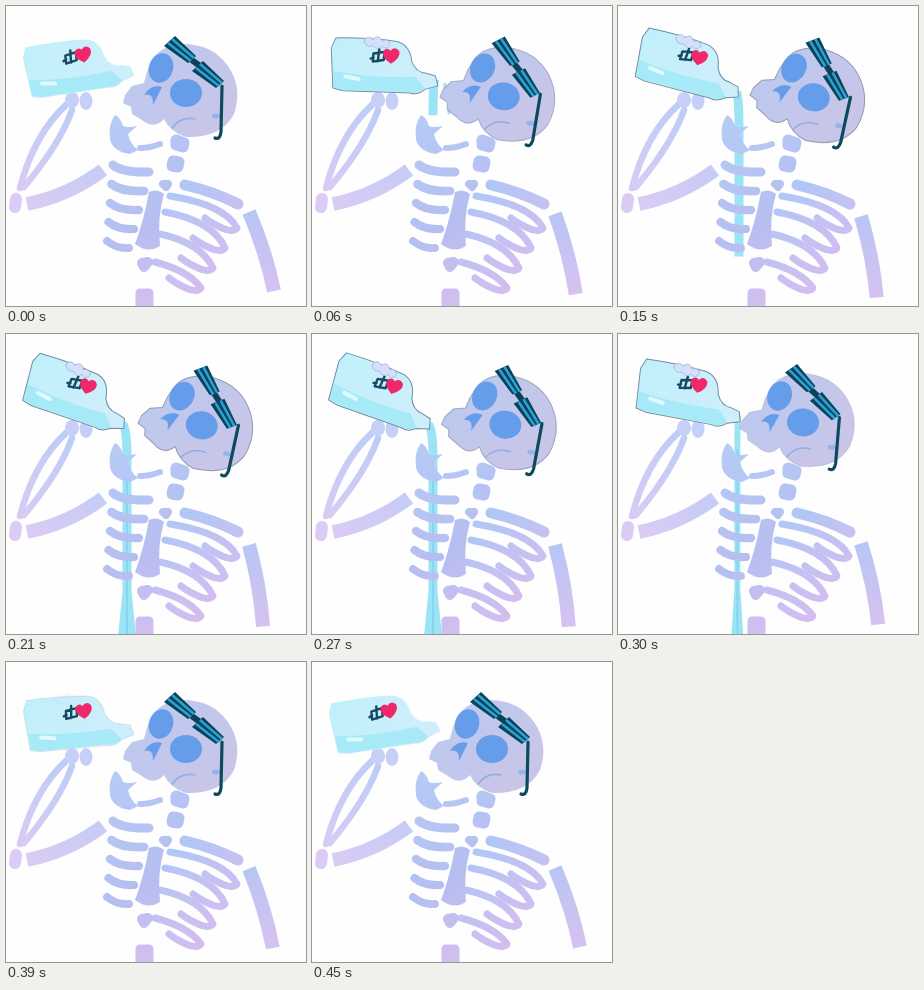
These frames come from a looping animation (300x300 px, 540 ms). An HTML page:

```html
<!DOCTYPE html>
<html lang="en">
<head>
<meta charset="utf-8">
<title>Thirsty skeleton</title>
<style>
  html, body { margin: 0; width: 100%; height: 100%; overflow: hidden; background: #fefefe; }
  svg { display: block; width: 100vw; height: 100vh; }
</style>
</head>
<body>
<svg viewBox="0 0 300 300" fill="none" stroke-linecap="round" stroke-linejoin="round">
  <defs>
    <linearGradient id="bone" gradientUnits="userSpaceOnUse" x1="110" y1="110" x2="200" y2="290">
      <stop offset="0" stop-color="#b5cbf6"/>
      <stop offset=".55" stop-color="#b6bef0"/>
      <stop offset="1" stop-color="#d9bff0"/>
    </linearGradient>
    <linearGradient id="rib" gradientUnits="userSpaceOnUse" x1="155" y1="190" x2="215" y2="260">
      <stop offset="0" stop-color="#adc8f6"/>
      <stop offset="1" stop-color="#d3bdf0"/>
    </linearGradient>
    <linearGradient id="arm" gradientUnits="userSpaceOnUse" x1="80" y1="100" x2="10" y2="200">
      <stop offset="0" stop-color="#b9cdf7"/>
      <stop offset="1" stop-color="#dccbf4"/>
    </linearGradient>
    <linearGradient id="side" gradientUnits="userSpaceOnUse" x1="240" y1="205" x2="265" y2="290">
      <stop offset="0" stop-color="#b7c6f4"/>
      <stop offset="1" stop-color="#d8c1f0"/>
    </linearGradient>
    <linearGradient id="head" x1="0" y1="0" x2="1" y2=".6">
      <stop offset="0" stop-color="#b9caf0"/>
      <stop offset="1" stop-color="#c9c5e8"/>
    </linearGradient>
    <linearGradient id="glass" x1="0" y1="0" x2="1" y2=".3">
      <stop offset="0" stop-color="#bff0fb"/>
      <stop offset="1" stop-color="#cfeefb"/>
    </linearGradient>
  </defs>

  <path id="stream" fill="#9be4f6"/>
  <path id="streak" stroke="#78c8ec" stroke-width="2" opacity=".55"/>
  <path id="drops" fill="#9fe4f6" d="M137 101q5 4 0 8q-4-4 0-8zM133 76q4 4 0 8q-4-4 0-8z"/>

  <g stroke="url(#arm)">
    <path stroke-width="6.5" d="M61 98Q28 128 14 182"/>
    <path stroke-width="6.5" d="M66 104Q54 138 18 181"/>
    <path stroke-width="14" stroke-linecap="butt" d="M21 198Q62 190 97 164"/>
    <path stroke-width="12" d="M10 193l-1 8"/>
  </g>
  <g id="ribs"></g>
  <g stroke="url(#bone)">
    <path stroke-width="11" d="M170 134l8 3l-1 4l-7-2zM167 155l6 1l-1 5l-6-1z"/>
    <path stroke-width="8" d="M157 178l5 0l-2 3z"/>
    <path stroke-width="10" d="M136 257l6-1l-4 5z"/>
    <path stroke-width="9" d="M134 287h9v14h-9z" fill="url(#bone)"/>
    <path stroke-width="6" d="M134 142Q144 142 154 138"/>
    <path stroke-width="11" stroke="url(#rib)" d="M179 179Q206 185 232 198"/>
  </g>
  <g fill="url(#bone)">
    <path d="M109 109Q102 118 104 134Q108 146 124 148L132 144Q124 138 122 128L131 120Q121 122 117 120Q114 111 109 109Z"/>
    <path d="M143 186Q151 182 158 188Q151 212 154 240Q142 248 129 238Q138 214 143 186Z"/>
  </g>
  <path id="side-arm" stroke="url(#side)" stroke-width="14" stroke-linecap="butt" d="M243 206Q260 246 268 285"/>

  <g id="skull">
    <path id="cranium" fill="url(#head)" stroke="#7f89a8" d="M126 80L138 77Q140 66 145 56Q152 41 174 38Q206 37 222 60Q237 82 228 108Q216 132 180 131Q164 126 158 113Q148 124 136 114L126 108L125 101L117 97L119 89Z"/>
    <g fill="#669deb">
      <ellipse cx="155" cy="62" rx="12" ry="15" transform="rotate(18 155 62)"/>
      <ellipse cx="180" cy="87" rx="16" ry="14"/>
      <path d="M138 89Q145 78 156 81L147 99Q148 86 138 89Z"/>
      <ellipse cx="210" cy="110" rx="4" ry="2.5" fill="#94b4ee"/>
    </g>
    <path stroke="#93aee0" stroke-width="1.6" d="M166 122Q175 110 189 113"/>
    <path stroke="#0c4a5f" stroke-width="3.2" d="M216 80L215 126Q214 134 209 132"/>
    <g id="glasses">
      <path stroke="#0b425a" stroke-width="6" d="M183 52L194 60"/>
      <g id="lens">
        <path fill="#0b425a" d="M158 40L169 30L190 50L182 57Z"/>
        <path stroke="#2aa2d4" stroke-width="2.6" stroke-linecap="butt" d="M162 37L185 55M166 33L188 52"/>
      </g>
      <use href="#lens" x="28" y="25"/>
    </g>
  </g>

  <g fill="#c5cff7">
    <ellipse cx="66" cy="94" rx="7" ry="8"/>
    <ellipse cx="80" cy="95" rx="6.5" ry="9"/>
  </g>
  <g id="bottle">
    <path id="outline" fill="url(#glass)" stroke="#6d8ea3" d="M20 40L25 30Q60 31 86 36Q99 40 100 57Q104 68 114 69L123 72L125 82L112 85Q104 91 97 88L30 83L20 80Z"/>
    <path fill="#9fe9f8" opacity=".8" d="M21 63Q60 72 103 72L112 84Q104 90 97 87L30 82L21 79Z"/>
    <path stroke="#eefcff" stroke-width="4" opacity=".8" d="M33 69L46 72"/>
    <path stroke="#174a60" stroke-width="2.4" d="M62 47l11-1l-1 8l-11 1zM68 43l-2 12M59 52l3-1"/>
    <path fill="#f0286b" d="M79 58Q69 51 72 45Q76 41 79 45Q84 40 88 46Q89 53 79 58Z"/>
    <path id="fingers" fill="#d5e0fa" stroke="#a9b6d6" stroke-width=".8" d="M53 35q3-8 9-2q6-6 9 2q7-3 8 4q-4 6-8 1q-5 5-9-1q-6 3-9-4z"/>
  </g>
</svg>
<script>
const LOOP = 540, STEP = 30, FLOOR = 302;
const PIVOT = [72, 60], NECK = [50, 16];
const el = id => document.getElementById(id);
const set = (id, attrs) => { for (const k in attrs) el(id).setAttribute(k, attrs[k]); };
const ramp = (t, a, b) => Math.max(0, Math.min(1, (t - a) / (b - a)));
const smooth = x => x * x * (3 - 2 * x);

function drawRibs() {
  const rod = (color, width, d) => `<path stroke="url(#${color})" stroke-width="${width}" d="${d}"/>`;
  let out = '';
  for (let i = 0; i < 5; i++) {
    out += rod('bone', 9 - i * .3, `M${107 - i * 1.5} ${159 + i * 19}q10 8 ${36 - i * 3.5} 7`);
  }
  for (let i = 0; i < 4; i++) {
    const x = 164 - 5 * i, y = 190 + 13 * i + 3 * i * i;
    const tipX = 231 - 12 * i, tipY = 222 + 20 * i;
    out += rod('rib', 7, `M${x} ${y}Q${tipX - 12} ${y + 9} ${tipX} ${tipY}q-4 5-15 0t-17-10`);
  }
  el('ribs').innerHTML = out;
}

// Bottle tilt, 0 = resting, 1 = fully tipped
const lift = t => t < 270
  ? Math.sin(Math.PI / 2 * ramp(t, 0, 240))
  : (1 - ramp(t, 270, 450)) ** 2;

// Head turn, 0 = at the bottle, 1 = leaning away
const lean = t => smooth(ramp(t, 0, 90)) * (1 - smooth(ramp(t, 250, 330)));

function drawHead(k) {
  set('skull', { transform: `translate(${18.5 * k} ${2 * k}) rotate(${11 * k} 166.5 74)` });
  set('glasses', { transform: `rotate(${10 * k} 188 57)` });
  set('cranium', { 'stroke-opacity': .8 * k });
}

function drawBottle(angle, shown) {
  set('bottle', { transform: `rotate(${angle} ${PIVOT})` });
  set('outline', { 'stroke-opacity': shown });
  set('fingers', { opacity: shown });
}

function drawStream(t, angle) {
  const a = angle * Math.PI / 180, thin = ramp(t, 270, 360);
  const x = PIVOT[0] + NECK[0] * Math.cos(a) - NECK[1] * Math.sin(a);
  const y = PIVOT[1] + NECK[0] * Math.sin(a) + NECK[1] * Math.cos(a);
  const endX = 121 - 5 * thin, endY = Math.min(FLOOR, 15 + 1.57 * t);
  const half = 4.5 * (1 - thin), foot = half * (1 + ramp(t, 150, 210));
  const midY = y + 35, bend = endY - (endY - midY) * .25;
  const on = t >= 60 && thin < 1;
  set('stream', {
    visibility: on ? 'visible' : 'hidden',
    d: `M${x - half} ${y}Q${endX - half} ${y + 8} ${endX - half} ${midY}L${endX - half} ${bend}L${endX - foot} ${endY}` +
      `H${endX + foot}L${endX + half} ${bend}V${midY}Q${endX + half} ${y + 8} ${x + half} ${y}Z`
  });
  set('streak', { visibility: t >= 180 && t < 330 ? 'visible' : 'hidden', d: `M${endX} ${midY}V${endY}` });
  set('drops', { visibility: t >= 60 && t < 150 ? 'visible' : 'hidden' });
}

function draw(ms) {
  const t = Math.min(450, Math.floor(ms % LOOP / STEP) * STEP);
  const up = lift(t), angle = -13 + 28 * up;
  drawHead(lean(t));
  drawBottle(angle, ramp(up, .05, .4));
  drawStream(t, angle);
  set('side-arm', { transform: `translate(0 ${5 * up}) rotate(${8 * up} 243 206)` });
}

let start;
function tick(now) {
  start ??= now;
  draw(now - start);
  requestAnimationFrame(tick);
}
drawRibs();
draw(0);
requestAnimationFrame(tick);
</script>
</body>
</html>
```
